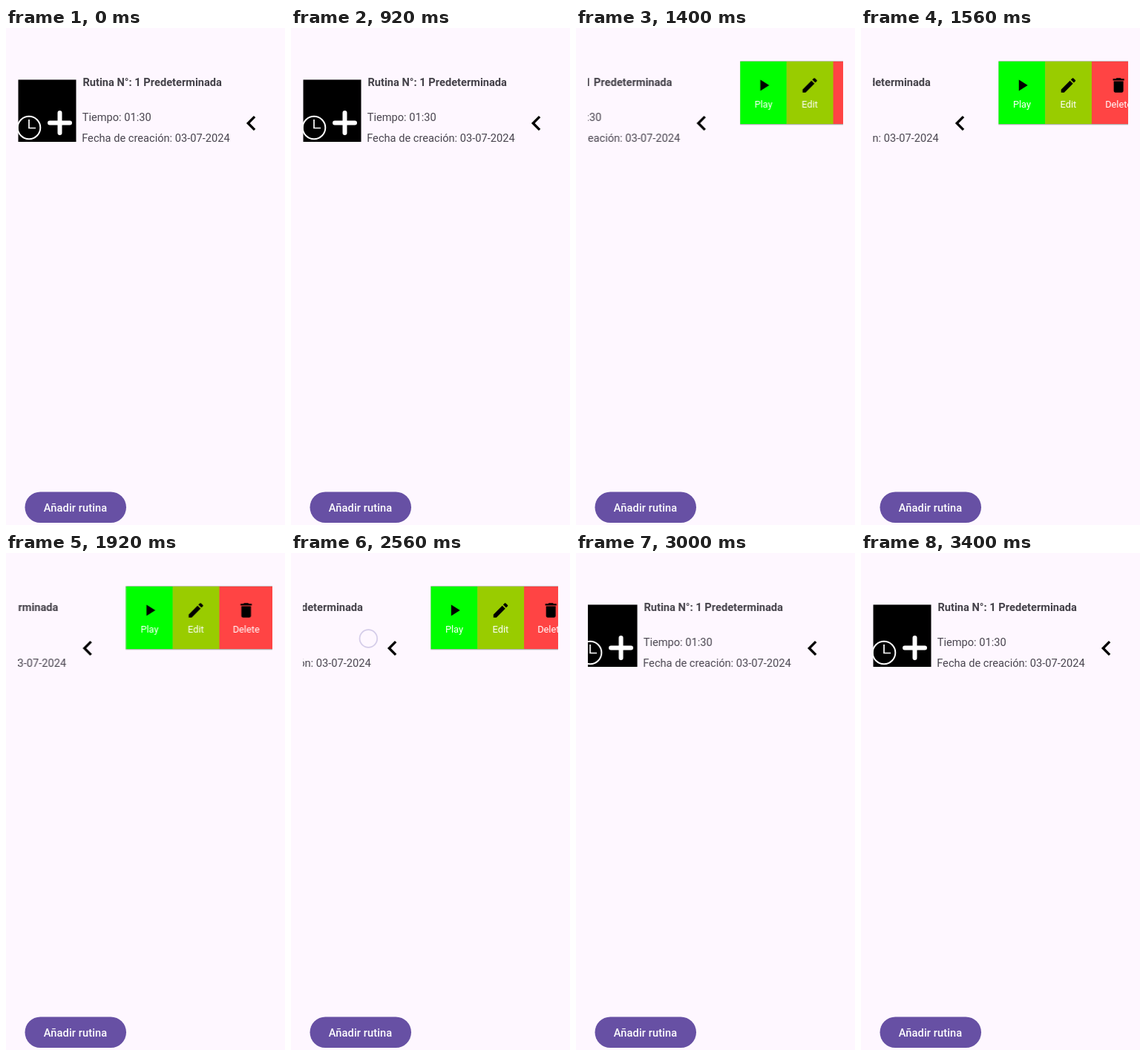
These frames come from a looping animation (376 by 668 pixels, 3440 ms). An HTML page:

```html
<!DOCTYPE html>
<html lang="es">
<head>
<meta charset="utf-8">
<title>Rutinas</title>
<style>
  html, body { margin: 0; width: 100%; height: 100%; overflow: hidden; background: #fef7ff; }
  svg { display: block; width: 376px; height: 668px; }
  text { font: 14.64px Roboto, sans-serif; fill: #49454f; }
  .title { font-weight: 700; fill: #434048; }
  .add { font-weight: 500; letter-spacing: .1px; fill: #fff; }
  .label { font-size: 12.8px; fill: #fff; text-anchor: middle; }

  .row { animation: scroll 3440ms infinite; }
  .touch {
    fill: #fef7ff; fill-opacity: .55; stroke: #d3cbe8; stroke-width: 1.7;
    opacity: 0; animation: 3440ms step-end infinite;
  }
  .open { animation-name: press-open; }
  .close { animation-name: press-close; }

  @keyframes scroll {
    0% { transform: translateX(0); animation-timing-function: linear; }
    29.07% { transform: translateX(0); animation-timing-function: cubic-bezier(.5, 0, .8, .7); }
    34.884% { transform: translateX(-76px); animation-timing-function: cubic-bezier(.3, .51, .7, .89); }
    45.349% { transform: translateX(-197px); animation-timing-function: cubic-bezier(.3, .57, .6, 1); }
    55.814% { transform: translateX(-220.5px); animation-timing-function: linear; }
    69.767% { transform: translateX(-220.5px); animation-timing-function: cubic-bezier(.6, 0, .85, .5); }
    74.419% { transform: translateX(-194.5px); animation-timing-function: cubic-bezier(.3, .4, .65, .93); }
    87.209% { transform: translateX(-12px); animation-timing-function: cubic-bezier(.2, .5, .5, 1); }
    97.674%, 100% { transform: translateX(0); }
  }
  @keyframes press-open {
    0% { opacity: 0; }
    27.907% { opacity: 1; }
    38.372%, 100% { opacity: 0; }
  }
  @keyframes press-close {
    0% { opacity: 0; }
    69.767% { opacity: 1; }
    81.395%, 100% { opacity: 0; }
  }
</style>
</head>
<body>
<svg viewBox="0 0 376 668">
  <clipPath id="viewport"><rect x="16.5" y="40" width="343" height="120"/></clipPath>

  <g clip-path="url(#viewport)">
    <g class="row">
      <path d="M16.5 69.5h78v83.5h-78z"/>
      <g fill="none" stroke="#fff">
        <circle cx="31" cy="134" r="15.3" stroke-width="2"/>
        <path d="M31 123v11.5h9" stroke-width="1.7"/>
        <path d="M59 127.5h27M72.5 114v27" stroke-width="6" stroke-linecap="round"/>
      </g>

      <text class="title" x="103.5" y="78">Rutina N°: 1 Predeterminada</text>
      <text x="102.7" y="125">Tiempo: 01:30</text>
      <text x="102.2" y="153">Fecha de creación: 03-07-2024</text>
      <path transform="translate(310.6 108) scale(1.667)" d="M15.41 7.41 14 6l-6 6 6 6 1.41-1.41L10.83 12z"/>

      <path fill="#b4b4b4" d="M382.3 44.2h198.2v86H382.3z"/>
      <path fill="#0f0" d="M382.5 45h63v84h-63z"/>
      <path fill="#9c0" d="M445.2 45h63v84h-63z"/>
      <path fill="#f44" d="M508 45h72.5v84H508z"/>
      <path transform="translate(401.2 64) scale(1.08)" d="M8 5v14l11-7z"/>
      <path transform="translate(463.5 64) scale(1.08)" d="M3 17.25V21h3.75L17.81 9.94l-3.75-3.75zM20.71 7.04a1 1 0 0 0 0-1.41l-2.34-2.34a1 1 0 0 0-1.41 0l-1.83 1.83 3.75 3.75z"/>
      <path transform="translate(531.2 64) scale(1.08)" d="M6 19c0 1.1.9 2 2 2h8c1.1 0 2-.9 2-2V7H6zM19 4h-3.5l-1-1h-5l-1 1H5v2h14z"/>
      <text class="label" x="414" y="107">Play</text>
      <text class="label" x="476.4" y="107">Edit</text>
      <text class="label" x="544.2" y="107">Delete</text>

      <circle class="touch open" cx="159" cy="113" r="11.8"/>
      <circle class="touch close" cx="298.3" cy="115" r="11.8"/>
    </g>
  </g>

  <rect x="25.5" y="623.5" width="136.5" height="41.5" rx="20.75" fill="#6750a4"/>
  <text class="add" x="50.8" y="650">Añadir rutina</text>
</svg>
</body>
</html>
```
